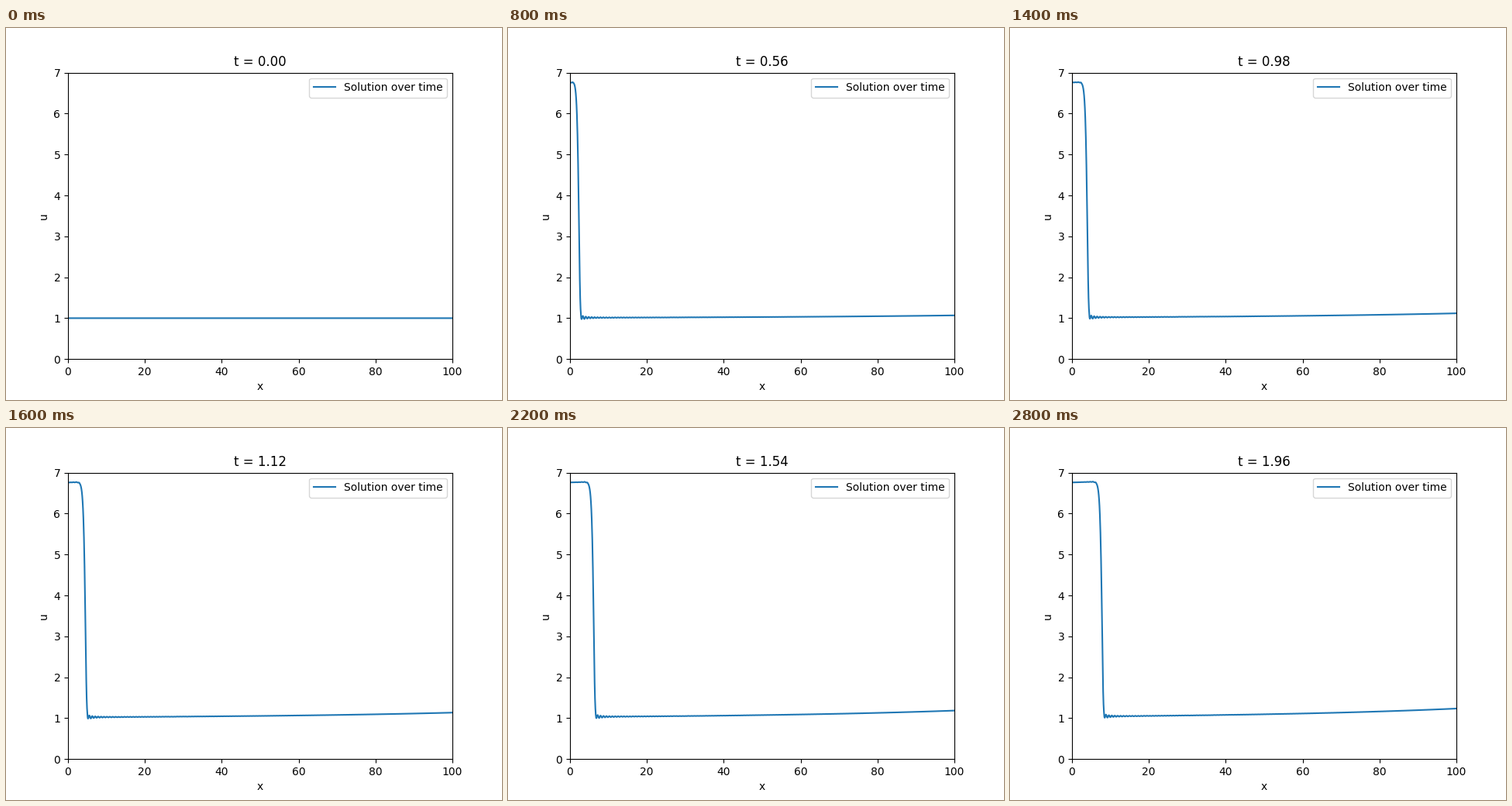
A matplotlib script for the animation above (2900 ms loop, 640 by 480 pixels).

```python
import math

import numpy as np
import matplotlib.pyplot as plt
from matplotlib.animation import FuncAnimation

STEPS = 29
DT = 0.07
DX = 0.05
INLET = 6.76
RIPPLE = 0.76  # wavelength of the ripples around the front

x = np.linspace(0, 100, round(100 / DX) + 1)
source = 0.02 * np.exp(0.0181 * x)


def advance(u):
    """One backward Euler step of the Burgers equation with upwind fluxes."""
    r = DT / DX
    rhs = u + DT * source
    new = [INLET]
    for b in rhs[1:].tolist():
        c = b + 0.5 * r * new[-1] ** 2
        new.append((math.sqrt(1 + 2 * r * c) - 1) / r)
    return np.array(new)


def add_ripples(u, t):
    """Small oscillations ahead of the front and on the plateau behind it."""
    excess = u - 1 - source * t
    k = np.nonzero(excess > 0.15)[0][-1]
    part = (excess[k] - 0.15) / (excess[k] - excess[k + 1])
    d = x - (x[k] + part * DX)
    wave = 2 * np.pi * d / RIPPLE
    ahead = -0.07 * np.sin(wave) / (1 + np.maximum(d, 0) / 0.8)
    behind = 0.008 * np.sin(wave) * np.exp(np.minimum(d + 2, 0) / 2)
    return u + np.where(d > 0, ahead, np.where(d < -2, behind, 0))


def solve():
    u = np.ones_like(x)
    states = [u]
    for n in range(1, STEPS):
        u = advance(u)
        states.append(add_ripples(u, n * DT))
    return states


states = solve()

fig, ax = plt.subplots(figsize=(6.4, 4.8), dpi=100)
line, = ax.plot(x, states[0], label="Solution over time")
ax.set_xlim(0, 100)
ax.set_ylim(0, 7)
ax.set_xlabel("x")
ax.set_ylabel("u")
ax.legend(loc="upper right")
title = ax.set_title("t = 0.00")


def draw(n):
    line.set_ydata(states[n])
    title.set_text(f"t = {n * DT:.2f}")
    return line, title


anim = FuncAnimation(fig, draw, frames=STEPS, interval=100, repeat=True,
                     repeat_delay=0, blit=False)
plt.show()
```
